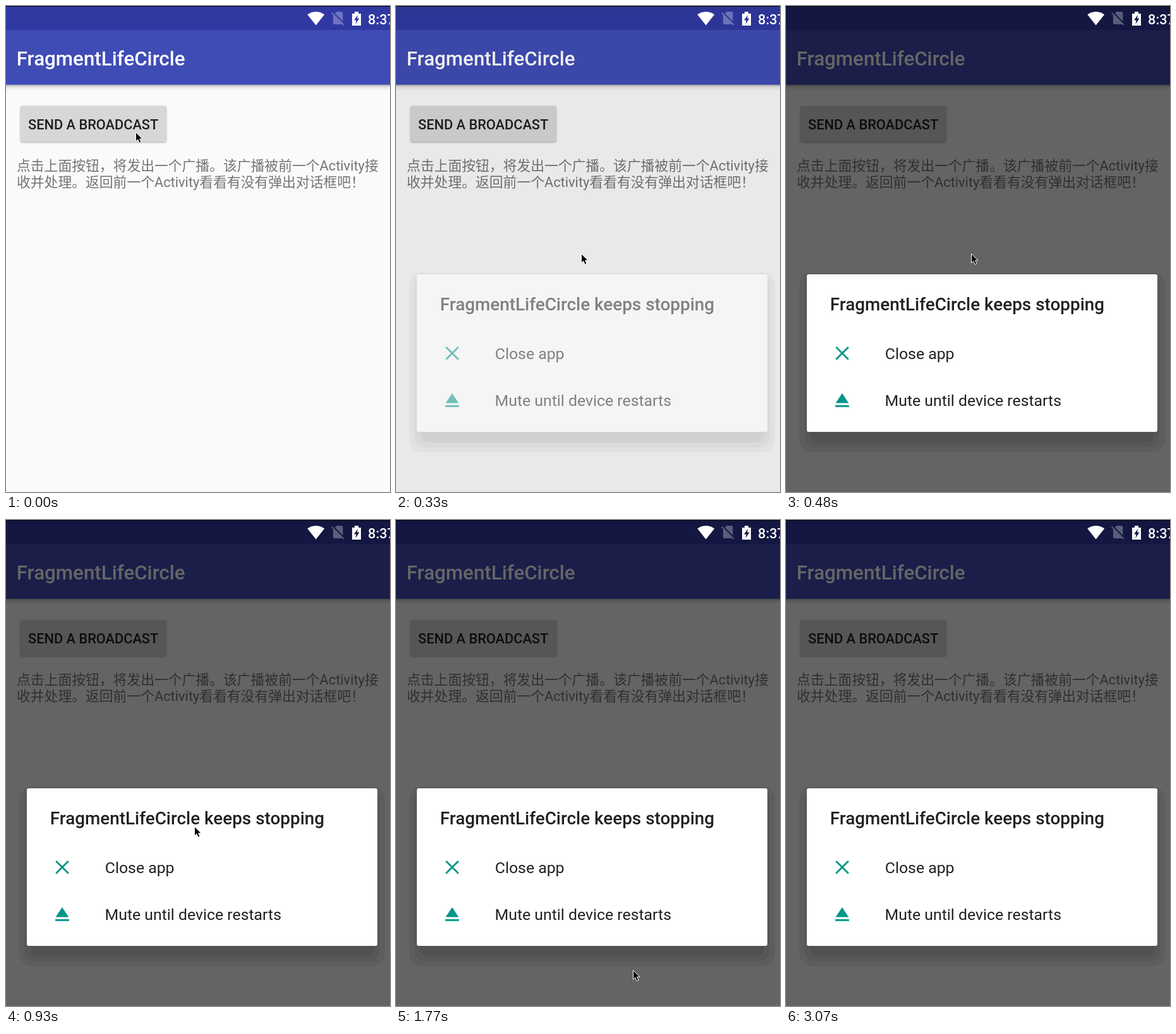
An HTML page with a canvas for the animation above (3880 ms loop, 608x768 px).

```html
<!DOCTYPE html>
<html lang="zh-CN">
<head>
<meta charset="utf-8">
<title>Broadcast demo</title>
<style>
html, body { margin: 0; width: 100%; height: 100%; overflow: hidden; background: #fafafa; }
canvas { display: block; }
</style>
</head>
<body>
<canvas id="stage" width="608" height="768"></canvas>
<script>
const W = 608, H = 768, LOOP = 3880;
const ctx = document.getElementById('stage').getContext('2d');
const SANS = 'Roboto, "Noto Sans CJK SC", "Noto Sans CJK", sans-serif';
const TEAL = '#009688';
const DIALOG_STEPS = [330, 390, 480];

// Pointer moves: each is a curve from the last resting point, shown in a few jumps
const HOME = [205, 199];
const MOVES = [
  { first: 60, last: 270, jumps: 4, bend: [255, 330], to: [293, 391] },
  { first: 930, last: 1280, jumps: 6, bend: [302, 697], to: [373, 681] },
  { first: 1450, last: 1770, jumps: 6, bend: [383, 696], to: [375, 711] },
  { first: 2850, last: 3070, jumps: 5, bend: [459, 727], to: [510, 775] }
];

const WIFI = new Path2D('M12 21.5L23.64 7C23.2 6.66 18.7 3 12 3S.81 6.66.36 7z');
const NO_SIM = new Path2D('M19 5c0-1.1-.9-2-2-2h-7L7.66 5.34 19 16.68zM3.65 3.88L2.38 5.15 5 7.77V19c0 1.1.9 2 2 2h10c.35 0 .67-.1.96-.26l1.88 1.88 1.27-1.27z');
const BATTERY = new Path2D('M552 9h6v3h4v19h-14v-19h4zM557 14l-6 8.5h3.5l-1 6 6-9h-3.5z');
const EJECT = new Path2D('M5 17h14v2H5zM12 5L5.33 15h13.34z');
const ARROW = new Path2D('M.5.5V15L3.8 12 6.2 17.4 8.9 16.2 6.6 11H11z');

function rect(x, y, w, h, color) {
  ctx.fillStyle = color;
  ctx.fillRect(x, y, w, h);
}

function round(x, y, w, h, r, color) {
  ctx.fillStyle = color;
  ctx.beginPath();
  ctx.roundRect(x, y, w, h, r);
  ctx.fill();
}

function text(str, x, y, size, color, weight = 400) {
  ctx.font = `${weight} ${size}px ${SANS}`;
  ctx.fillStyle = color;
  ctx.fillText(str, x, y);
}

function icon(path, x, y, scale, color) {
  ctx.save();
  ctx.translate(x, y);
  ctx.scale(scale, scale);
  ctx.fillStyle = color;
  ctx.fill(path, 'evenodd');
  ctx.restore();
}

const black = alpha => `rgba(0,0,0,${alpha})`;

function drawPage() {
  rect(0, 0, W, H, '#fafafa');
  const shade = ctx.createLinearGradient(0, 125, 0, 134);
  shade.addColorStop(0, black(0.24));
  shade.addColorStop(0.4, black(0.08));
  shade.addColorStop(1, black(0));
  rect(0, 124, W, 10, shade);
  rect(0, 0, W, 38, '#3039a2');
  rect(0, 38, W, 86.5, '#404cb6');
  text('FragmentLifeCircle', 16.8, 93.5, 31.3, '#fff', 500);

  ctx.save();
  ctx.shadowColor = black(0.35);
  ctx.shadowBlur = 3;
  ctx.shadowOffsetY = 1;
  round(23, 158, 230.5, 56.5, 3, '#d6d7d7');
  ctx.restore();
  text('SEND A BROADCAST', 35, 195, 21.75, '#1f1f1f', 500);

  text('点击上面按钮，将发出一个广播。该广播被前一个Activity接', 17, 260, 21.8, '#757575');
  text('收并处理。返回前一个Activity看看有没有弹出对话框吧！', 17, 285.5, 21.8, '#757575');
}

function drawStatus() {
  icon(WIFI, 476.8, 5.5, 1.16, '#fff');
  icon(NO_SIM, 512.4, 5.8, 1.1, 'rgba(255,255,255,.3)');
  icon(BATTERY, 0, 0, 1, '#fff');
  text('8:37', 573, 28.5, 21.8, '#fff', 500);
  rect(0, 0, W, 1, '#000');
}

function drawDialog(step, dim) {
  for (let i = 0; i < 3; i++) {
    round(21 + 8.5 * i, 421 + 4 * i, 579 - 17 * i, 284 - 11.5 * i, 20 - 3 * i, black(0.03 + 0.06 * dim));
  }
  const gray = 250 * (1 - dim);
  round(33, 424, 555, 249, 3, `rgb(${gray},${gray},${gray})`);
  ctx.globalAlpha = 1 - 0.45 ** (step * step);
  round(33, 424, 555, 249, 3, '#fff');
  text('FragmentLifeCircle keeps stopping', 69.8, 481, 27.85, '#212121', 500);
  text('Close app', 156.8, 558, 24.8, '#212121');
  text('Mute until device restarts', 156.6, 632, 24.8, '#212121');
  ctx.strokeStyle = TEAL;
  ctx.lineWidth = 2.8;
  ctx.beginPath();
  for (const s of [-1, 1]) {
    ctx.moveTo(79.2, 548.7 - 9.7 * s);
    ctx.lineTo(98.8, 548.7 + 9.7 * s);
  }
  ctx.stroke();
  icon(EJECT, 70.3, 604.3, 1.55, TEAL);
  ctx.globalAlpha = 1;
}

function pointerAt(time) {
  let pos = HOME;
  for (const { first, last, jumps, bend, to } of MOVES) {
    if (time < first) break;
    const jump = 1 + Math.floor((time - first) / (last - first) * (jumps - 1));
    const p = Math.min(1, jump / jumps), q = 1 - p;
    pos = pos.map((from, i) => q * q * from + 2 * p * q * bend[i] + p * p * to[i]);
  }
  return pos.map(Math.round);
}

function drawPointer(time) {
  ctx.save();
  ctx.translate(...pointerAt(time));
  ctx.lineJoin = 'round';
  ctx.lineWidth = 1;
  ctx.fillStyle = '#000';
  ctx.fill(ARROW);
  ctx.strokeStyle = '#fff';
  ctx.stroke(ARROW);
  ctx.restore();
}

function frame(time) {
  const step = DIALOG_STEPS.filter(t => time >= t).length;
  const dim = 0.6 * (step / 3) ** 2;
  drawPage();
  rect(0, 0, W, H, black(dim));
  drawStatus();
  if (step) drawDialog(step, dim);
  drawPointer(time);
}

let start;
function tick(now) {
  start ??= now;
  frame(Math.max(0, now - start) % LOOP);
  requestAnimationFrame(tick);
}
frame(0);
requestAnimationFrame(tick);
</script>
</body>
</html>
```
